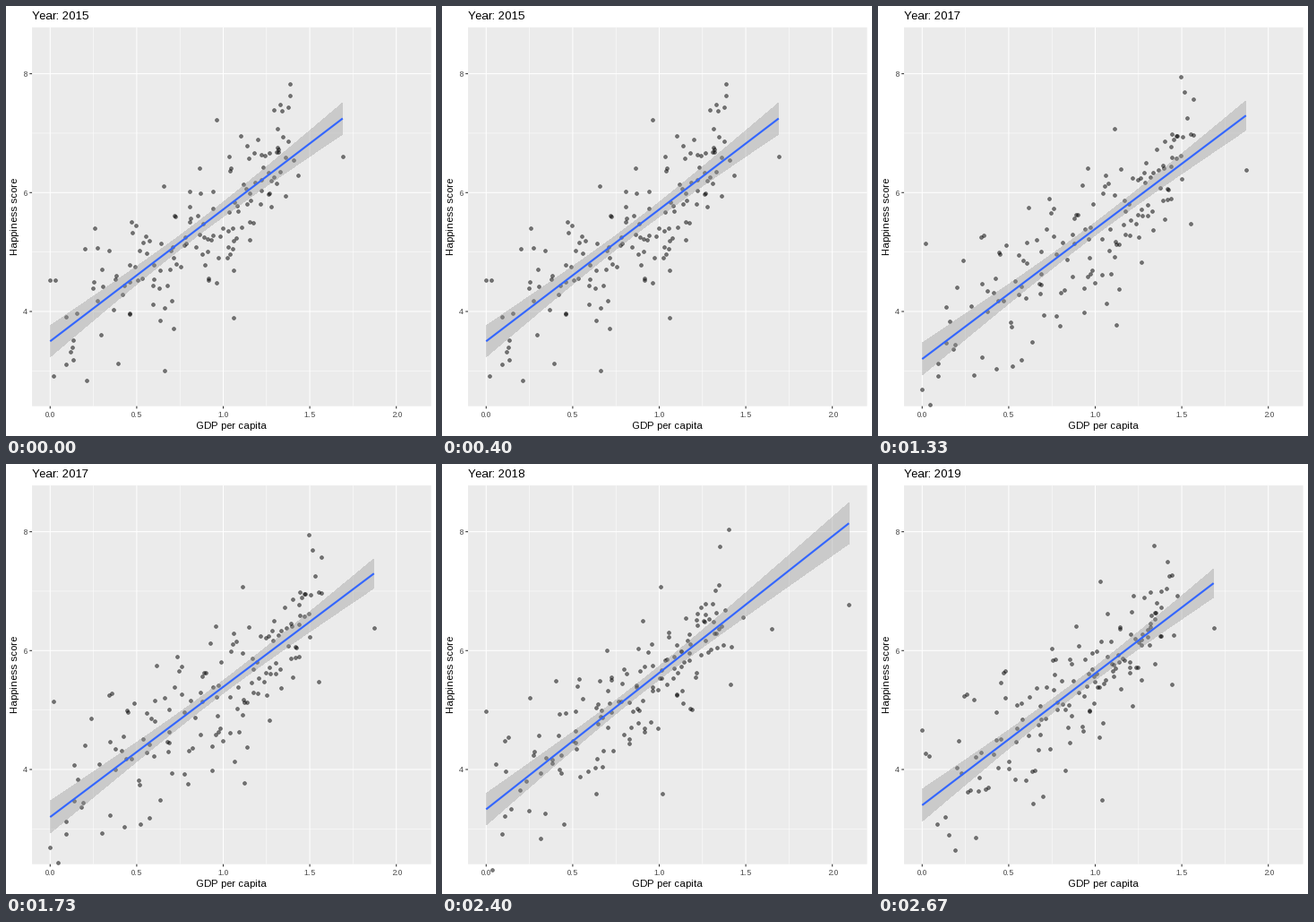
A matplotlib script that plays this animation: 480 px wide and 480 px high, repeating every 3330 ms.

```python
import matplotlib.pyplot as plt
import numpy as np
from matplotlib.animation import FuncAnimation

SIZE, DPI = 480, 72  # at 72 dpi one point is one pixel
STEP = 10
STARTS = [0, 670, 1330, 2000, 2670]
LOOP = 3330
LEFT, RIGHT, TOP, BOTTOM = 29.05, 474.5, 23.8, 446.7

plt.rcParams["font.family"] = "Liberation Sans"
plt.rcParams["text.hinting_factor"] = 1  # whole-pixel letter spacing


def px(gdp):
    return 49.3 + 193.2 * gdp


def py(score):
    return 75.6 + 66.35 * (8 - score)


def countries(rng, count, base, slope, top):
    """Random scatter that rises along the line, with a happier rich end."""
    rank = (np.arange(count) + rng.random(count)) / count
    wealth = rank ** 0.65
    gdp = np.abs(top * wealth + rng.normal(0, 0.03, count))
    noise = rng.normal(0, 1, count) * (0.74 - 0.3 * wealth)
    offset = noise.clip(-1.3, 1.2) + 0.8 * wealth ** 6
    offset -= np.polyval(np.polyfit(gdp, offset, 1), gdp)
    return np.column_stack([gdp, base + slope * gdp + offset])


def make_year(year, count, fit, spread, top, extremes):
    """Points, regression line and confidence band, in pixels.

    fit: intercept and slope; spread: mean gdp, band half width at the mean
    and band growth away from it; top: where the bulk of the points ends.
    """
    base, slope = fit
    mean, half, growth = spread
    bulk = countries(np.random.default_rng(year), count - len(extremes),
                     base, slope, top)
    points = np.vstack([extremes, bulk])

    gdp = np.linspace(0, points[:, 0].max(), 80)
    score = base + slope * gdp
    band = np.hypot(half, growth * (gdp - mean))
    x = px(gdp)
    return {
        "title": f"Year: {year}",
        "points": (px(points[:, 0]), py(points[:, 1])),
        "line": (x, py(score)),
        "band": np.column_stack([
            np.append(x, x[::-1]),
            np.append(py(score + band), py(score - band)[::-1]),
        ]),
    }


years = [
    make_year(2015, 158, (3.499, 2.218), (0.846, 0.112, 0.278), 1.40,
              [(0, 4.52), (0.02, 2.91), (0.21, 2.84), (0.66, 3.01),
               (1.06, 3.90), (0.96, 7.23), (1.69, 6.61)]),
    make_year(2016, 157, (3.30, 2.188), (0.954, 0.110, 0.267), 1.50,
              [(0, 5.44), (0.07, 2.91), (0.75, 3.07), (1.09, 3.97),
               (1.07, 7.09), (1.51, 5.46), (1.824, 6.38)]),
    make_year(2017, 155, (3.20, 2.190), (0.985, 0.105, 0.249), 1.55,
              [(0, 2.69), (0.02, 5.15), (0.09, 2.91), (1.12, 3.77),
               (1.11, 7.08), (1.55, 5.47), (1.871, 6.38)]),
    make_year(2018, 156, (3.33, 2.296), (0.891, 0.106, 0.270), 1.40,
              [(0, 4.98), (0.09, 2.91), (1.02, 3.59), (1.01, 7.07),
               (1.41, 5.43), (1.65, 6.37), (2.096, 6.77)]),
    make_year(2019, 156, (3.399, 2.218), (0.905, 0.107, 0.270), 1.43,
              [(0, 4.67), (0.31, 2.85), (1.04, 3.49), (1.03, 7.17),
               (1.44, 5.43), (1.34, 7.77), (1.684, 6.38)]),
]

fig = plt.figure(figsize=(SIZE / DPI, SIZE / DPI), dpi=DPI, facecolor="white")
ax = fig.add_axes([0, 0, 1, 1])
ax.set(xlim=(0, SIZE), ylim=(SIZE, 0))
ax.axis("off")


def label(x, y, text, size, color="black", **kw):
    return ax.text(x, y, text, size=size, color=color, va="baseline", **kw)


def grid(gdps, scores, width):
    style = dict(color="white", lw=width, snap=False, zorder=1)
    ax.vlines([px(g) for g in gdps], TOP, BOTTOM, **style)
    ax.hlines([py(s) for s in scores], LEFT, RIGHT, **style)


ax.add_patch(plt.Rectangle((LEFT, TOP), RIGHT - LEFT, BOTTOM - TOP,
                           fc="#EBEBEB", lw=0, snap=False, zorder=0))
grid(np.arange(0.25, 2, 0.5), [3, 5, 7], 0.53)
grid(np.arange(0, 2.5, 0.5), [4, 6, 8], 1.07)

tick = dict(color="#333333", lw=1.07, snap=False, solid_capstyle="butt")
for g in np.arange(0, 2.5, 0.5):
    ax.plot([px(g)] * 2, [BOTTOM, BOTTOM + 2.75], **tick)
    label(px(g), 459, f"{g:.1f}", 8.8, "#4D4D4D", ha="center")
for s in (4, 6, 8):
    ax.plot([LEFT - 2.75, LEFT], [py(s)] * 2, **tick)
    label(24.1, py(s) + 3.2, str(s), 8.8, "#4D4D4D", ha="right")

label((LEFT + RIGHT) / 2, 472, "GDP per capita", 11, ha="center")
label(13.2, (TOP + BOTTOM) / 2, "Happiness score", 11, ha="center",
      rotation=90, rotation_mode="anchor")
title = label(LEFT, 15, "", 13.2)

dots, = ax.plot([], [], "o", ms=3.8, mew=0.71, color="black", alpha=0.5, zorder=3)
band = plt.Polygon([(0, 0)], fc="#999999", alpha=0.4, lw=0, antialiased=False,
                   zorder=4)
ax.add_patch(band)
trend, = ax.plot([], [], color="#3366FF", lw=2.13, solid_capstyle="butt", zorder=5)


def draw(i):
    now = i * STEP
    year = years[sum(start <= now for start in STARTS) - 1]
    title.set_text(year["title"])
    dots.set_data(*year["points"])
    band.set_xy(year["band"])
    trend.set_data(*year["line"])
    return title, dots, band, trend


anim = FuncAnimation(fig, draw, frames=LOOP // STEP, interval=STEP,
                     repeat=True, repeat_delay=0)
plt.show()
```
